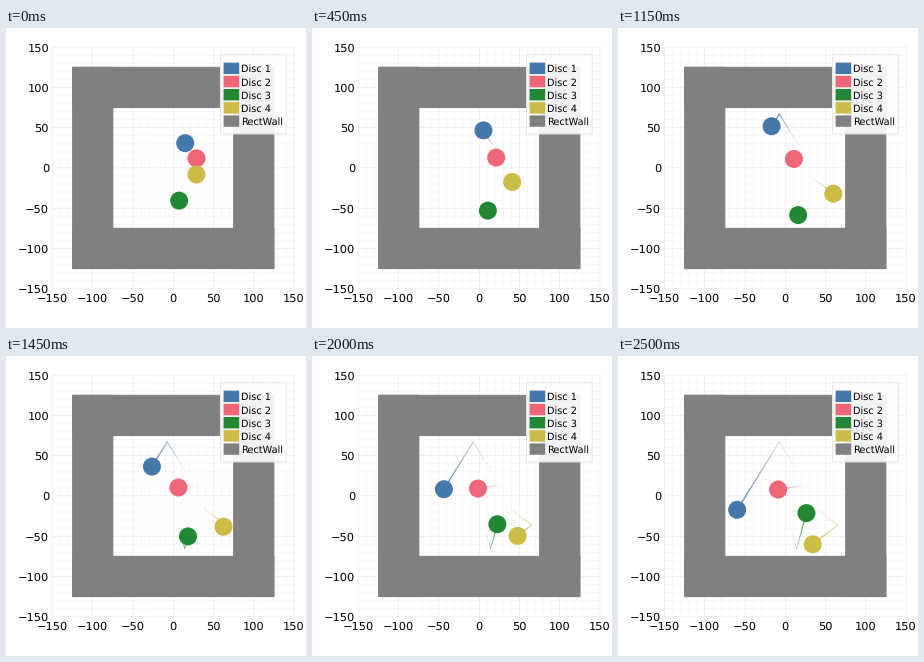
Recreate the animation shown at these times as a matplotlib script. Size 300x300 px, loop 2.55 s.

```python
from itertools import combinations

import numpy as np
import matplotlib.pyplot as plt
from matplotlib.animation import FuncAnimation
from matplotlib.collections import LineCollection
from matplotlib.colors import to_rgb
from matplotlib.patches import Circle, Rectangle

SIZE, DPI = 300, 100
FRAMES, STEP = 51, 50         # frame count, ms per frame
PT = 72 / DPI                 # points per pixel
SCALE = 0.805                 # pixels per data unit
SPAN = 300 * SCALE
LEFT, TOP = 46.5, 19.2        # plot area corner in pixels
HALF, THICK = 125, 50         # wall frame, data units
REACH = 10                    # disc radius for collisions
MARKER = 9 / SCALE            # drawn disc radius
GREY = "#808080"
COLORS = ["#4477AA", "#EE6677", "#228833", "#CCBB44"]

# state of each disc at the start, in units and units per second
START = np.array([(14.84, 30.82), (28.83, 11.98), (7.3, -40.6), (28.8, -8.1)])
VELOCITY = np.array([(14.6, -20.2), (-27.3, 17.2), (7.6, -27.6), (26.9, -20.8)])
MASS = np.array([1, 3.64, 1, 1])


def simulate():
    """Positions of all discs per frame, with elastic wall and disc hits."""
    pos, vel = START.copy(), VELOCITY.copy()
    limit = HALF - THICK - REACH
    path = [pos.copy()]
    for _ in range(FRAMES - 1):
        pos += vel * STEP / 1000
        vel[(np.abs(pos) > limit) & (pos * vel > 0)] *= -1
        for a, b in combinations(range(len(pos)), 2):
            gap = pos[b] - pos[a]
            dist = np.hypot(*gap)
            normal = gap / dist
            closing = (vel[a] - vel[b]) @ normal
            if dist < 2 * REACH and closing > 0:
                push = 2 * closing / (MASS[a] + MASS[b]) * normal
                vel[a] -= MASS[b] * push
                vel[b] += MASS[a] * push
        path.append(pos.copy())
    return np.array(path)


plt.rcParams["font.family"] = "DejaVu Sans"
plt.rcParams["text.hinting"] = "none"
fig = plt.figure(figsize=(SIZE / DPI, SIZE / DPI), dpi=DPI, facecolor="white")

# ax: plot area in data units; page: whole stage in pixels, y down
ax = fig.add_axes([LEFT / SIZE, 1 - (TOP + SPAN) / SIZE, SPAN / SIZE, SPAN / SIZE])
ax.set(xlim=(-150, 150), ylim=(-150, 150))
page = fig.add_axes([0, 0, 1, 1])
page.set(xlim=(0, SIZE), ylim=(SIZE, 0))
for area in (ax, page):
    area.axis("off")


def box(area, x, y, w, h, **style):
    area.add_patch(Rectangle((x, y), w, h, snap=False, **style))


def draw_grid():
    for v in range(-150, 151, 10):
        alpha = 0.1 if v % 50 == 0 else 0.05
        for line in (ax.axvline, ax.axhline):
            line(v, color="black", alpha=alpha, lw=0.5 * PT, zorder=0,
                 snap=False, clip_on=False)


def draw_labels():
    for v in range(-150, 151, 50):
        text = str(v).replace("-", "\u2212")
        x = LEFT + (v + 150) * SCALE
        y = TOP + (150 - v) * SCALE
        page.text(x, 274.2, text, size=8.2, ha="center", va="baseline")
        page.text(43, y + 4.2, text, size=8.2, ha="right", va="baseline")


def draw_walls():
    style = dict(fc=GREY, ec=GREY, lw=PT, zorder=10)
    for start in (-HALF, HALF - THICK):
        box(ax, start, -HALF, THICK, 2 * HALF, **style)
        box(ax, -HALF, start, 2 * HALF, THICK, **style)


def draw_legend():
    box(page, 214.5, 26.7, 65.7, 79.2, fc=(1, 1, 1, 0.9), ec="#e6e6e6", lw=PT)
    names = [f"Disc {i + 1}" for i in range(len(COLORS))] + ["RectWall"]
    for i, (name, color) in enumerate(zip(names, COLORS + [GREY])):
        y = 40.3 + 13.2 * i
        box(page, 217.6, y - 5.7, 15.6, 11.4, fc=color, lw=0)
        page.text(234.8, y + 3.9, name, size=7, va="baseline")


draw_grid()
draw_labels()
draw_walls()
draw_legend()

path = simulate()
trails, balls = [], []
for i, color in enumerate(COLORS):
    trails.append(ax.add_collection(LineCollection([], zorder=2 + i), autolim=False))
    balls.append(ax.add_patch(Circle(START[i], MARKER, fc=color, lw=0, zorder=2.5 + i)))


def update(n):
    fade = np.linspace(0, 1, n + 1)[1:]
    for i, (color, trail, ball) in enumerate(zip(COLORS, trails, balls)):
        ball.center = path[n, i]
        trail.set_segments(list(np.stack([path[:n, i], path[1:n + 1, i]], axis=1)))
        if n:
            trail.set_color([(*to_rgb(color), a) for a in fade])
            trail.set_linewidth(0.2 + 0.8 * fade)
    return trails + balls


anim = FuncAnimation(fig, update, frames=FRAMES, interval=STEP, repeat=True, blit=False)
plt.show()
```
